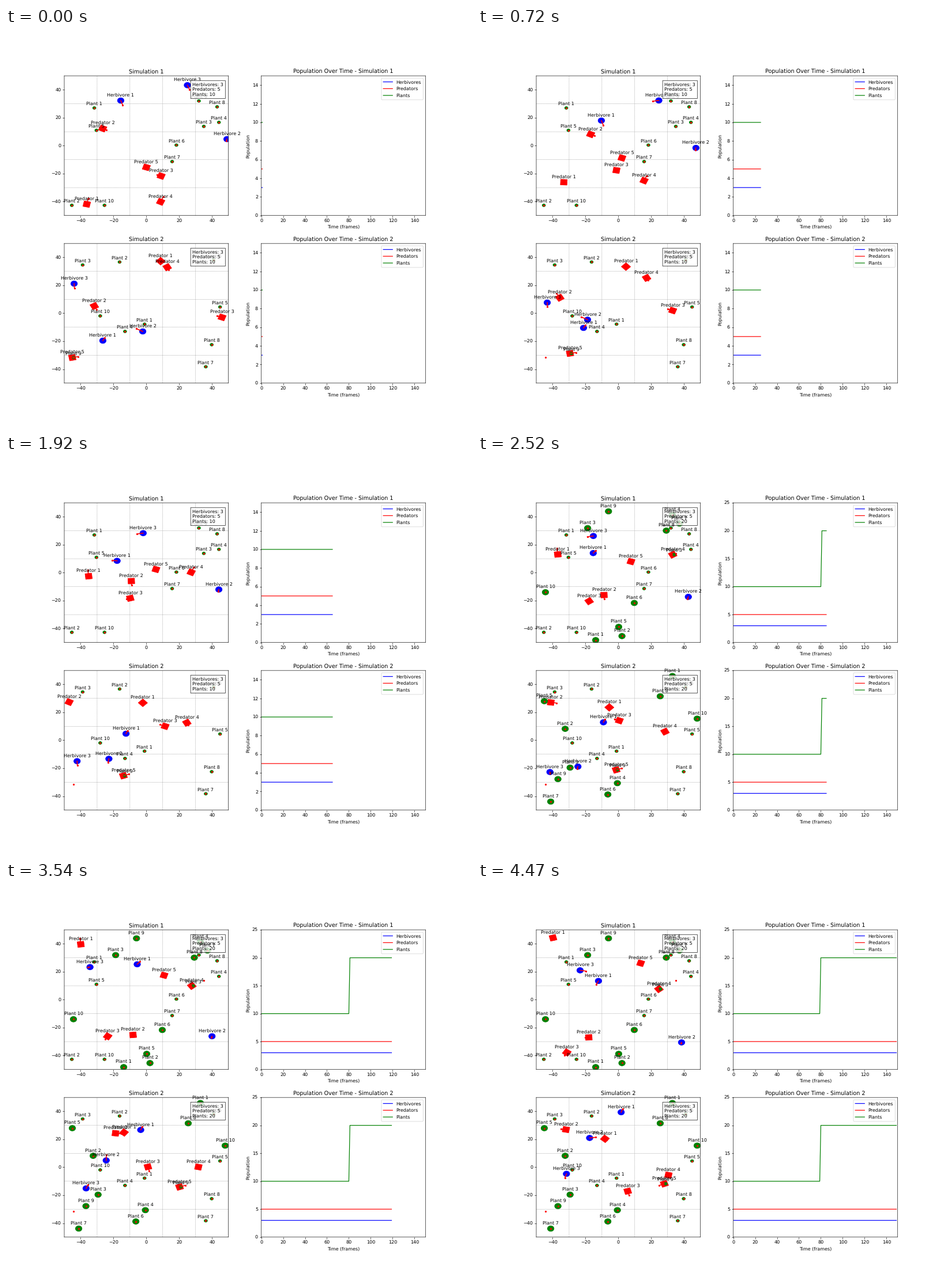
Recreate the animation shown at these times as a matplotlib script. Size 808 by 693 pixels, loop 4500 ms.

```python
import math

import matplotlib.pyplot as plt
import numpy as np
from matplotlib.animation import FuncAnimation
from matplotlib.patches import Circle, Polygon

plt.rcParams.update({"path.snap": False, "text.hinting": "none"})

DPI = 57.75
FRAMES, INTERVAL = 150, 30
SPROUT = 80          # step at which the second set of plants appears
WINDOW = 150         # longest history shown in the charts
HEADING = 5.5        # length of a heading line per unit of speed
REACH = 2.4          # a predator this close drags a plant along

STEPS = np.arange(FRAMES)
COLORS = {"Herbivore": "blue", "Predator": "red", "Plant": "green"}

# Movers run straight between a few turning points (step, x, y).
FIRST = {
    "Herbivore": [
        [(0, -15.6, 32.3), (42, -6.4, 7.2), (68, -19.9, 8.7), (120, -5, 26),
         (149, -12.1, 13.4)],
        [(0, 49.1, 4.7), (118, 40, -26.2), (149, 38.5, -30.6)],
        [(0, 25, 43.3), (17, 29.3, 33.1), (110, -32.5, 23.6), (128, -36.6, 23),
         (149, -23.3, 21)],
    ],
    "Predator": [
        [(0, -36.3, -41.9), (18, -33.3, -28), (40, -33, -21.3), (130, -41, 49),
         (149, -39.8, 44.3)],
        [(0, -26.6, 12.3), (42, -9.6, 5), (91, -8.6, -19.5), (124, -8, -26.5),
         (149, -18, -27)],
        [(0, 9, -21.7), (22, -0.9, -17.7), (52, -5, -17), (84, -17.8, -20.4),
         (108, -21, -22.5), (149, -31.4, -37.8)],
        [(0, 8.7, -40.2), (84, 33.1, 12.9), (118, 27.7, 9.9), (149, 24.7, 7.6)],
        [(0, 0, -15.5), (149, 13.6, 26.1)],
    ],
    "Plant": [
        (-31.7, 27), (-45.4, -42.7), (35, 13.8), (44.2, 16.7), (-30.4, 11),
        (18.3, 0.4), (15.7, -11.4), (43.1, 27.8), (32, 32), (-25.5, -42.7)],
    "Sprout": [
        (-13.8, -48.3), (2.2, -45.4), (-18.7, 31.9), (33, 41.4), (0.2, -38.8),
        (9.7, -21.7), (37.2, 35.2), (29.2, 30.1), (-6, 43.9), (-44.4, -14)],
}
SECOND = {
    "Herbivore": [
        [(0, -26.5, -19.6), (64, -12.4, 4.7), (149, 1.7, 39.4)],
        [(0, -2.2, -13), (28, -21.5, -3.2), (40, -20.5, -2), (66, -23, -14.2),
         (85, -24.7, -19.1), (139, -24.3, 20.2), (149, -17.5, 21)],
        [(0, -44, 21.2), (74, -41.9, -20.6), (96, -41.4, -25.3),
         (145, -30.9, -2.6), (149, -31.6, -4.7)],
    ],
    "Predator": [
        [(0, 8.7, 37.3), (94, -7.2, 21.9), (118, -13.6, 24.9), (149, -8.2, 20.4)],
        [(0, -31.7, 5.2), (7, -29.9, 1.8), (52, -45.2, 26.5), (73, -48.4, 28),
         (121, -16.8, 24.1), (149, -31.9, 27)],
        [(0, 46.1, -2.9), (91, -3.2, 15.5), (149, 5.7, -17.1)],
        [(0, 12.7, 33), (84, 28.4, 6.2), (118, 31.7, 0.2), (149, 30.5, -5.6)],
        [(0, -45.1, -31.7), (31, -24.9, -27.9), (61, -15.9, -26),
         (139, 33.5, -9.7), (149, 28, -11.8)],
    ],
    "Plant": [
        (-1.1, -7.8), (-16.3, 36.7), (-38.8, 34.6), (-13, -13), (44.9, 4.5),
        (41, 38), (36.2, -38.3), (39.8, -22.5), (-47, -30.7), (-28.1, -1.9)],
    "Sprout": [
        (32.9, 46), (-32.4, 8.2), (-29.4, -19.6), (-0.6, -30.7), (-45.1, 28),
        (-6.4, -38.8), (-41.2, -43.9), (25.5, 31.5), (-36.8, -27.8), (48, 15.5)],
}


def track(turns):
    """Position at every step along straight runs between turning points."""
    t, x, y = np.array(turns, float).T
    return np.column_stack([np.interp(STEPS, t, x), np.interp(STEPS, t, y)])


def rooted(home, hunters=()):
    """Track of a plant: still until a predator reaches it, then dragged."""
    spots = np.tile(np.array(home, float), (FRAMES, 1))
    for hunter in hunters:
        near = np.hypot(*(hunter - spots).T) < REACH
        if near.any():
            first = near.argmax()
            spots[first:] = hunter[first:] + (0.8, 0)
    return spots


def square(center, angle, half=2):
    corners = half * np.array([(-1, -1), (1, -1), (1, 1), (-1, 1)])
    c, s = math.cos(angle), math.sin(angle)
    return corners @ np.array([(c, s), (-s, c)]) + center


class Creature:
    def __init__(self, ax, kind, number, spots, radius=2, start=0):
        self.kind, self.spots, self.radius, self.start = kind, spots, radius, start
        # Each step shows the motion about to happen; the last repeats.
        moves = np.diff(spots, axis=0)
        self.moves = np.vstack([moves, moves[-1:]])
        home, color = spots[0], COLORS[kind]
        if kind == "Predator":
            self.body = Polygon(square(home, 0), color=color)
        else:
            self.body = Circle(home, radius, color=color)
        ax.add_patch(self.body)
        self.line, = ax.plot(*home[:, None], "r-", lw=2)
        self.dot, = ax.plot(*home[:, None], "ro", ms=3)
        self.label = ax.text(*home, f"{kind} {number}", ha="center")

    def update(self, step):
        for part in (self.body, self.line, self.dot, self.label):
            part.set_visible(step >= self.start)
        pos, move = self.spots[step], self.moves[step]
        self.label.set_position(pos + (0, self.radius + 1))
        if self.kind == "Predator":
            self.body.set_xy(square(pos, math.atan2(move[1], move[0])))
        else:
            self.body.center = pos
        if self.kind != "Plant":
            tip = pos + move * HEADING
            self.line.set_data(*np.transpose([pos, tip]))
            self.dot.set_data(*tip[:, None])


class Simulation:
    def __init__(self, number, data, field, chart):
        self.chart = chart
        field.set(xlim=(-50, 50), ylim=(-50, 50), title=f"Simulation {number}")
        for v in range(-30, 31, 20):
            style = dict(color="gray", ls="--", lw=0.5, zorder=0.5)
            field.axvline(v, **style)
            field.axhline(v, **style)

        self.creatures = []

        def add(kind, tracks, **options):
            for i, spots in enumerate(tracks, 1):
                self.creatures.append(Creature(field, kind, i, spots, **options))

        hunters = [track(turns) for turns in data["Predator"]]
        add("Herbivore", [track(turns) for turns in data["Herbivore"]])
        add("Predator", hunters)
        add("Plant", [rooted(p, hunters) for p in data["Plant"]], radius=1)
        self.stats = field.text(
            0.97, 0.953, "Herbivores: 3\nPredators: 5\nPlants: 10",
            transform=field.transAxes, ha="right", va="top", linespacing=1.13,
            multialignment="left", bbox=dict(facecolor="white", alpha=0.8))
        add("Plant", [rooted(p) for p in data["Sprout"]], start=SPROUT)

        chart.set(xlim=(0, 150), title=f"Population Over Time - Simulation {number}",
                  xlabel="Time (frames)", ylabel="Population")
        self.lines = [chart.plot([], [], color=color, label=kind + "s")[0]
                      for kind, color in COLORS.items()]
        chart.legend(loc="upper right")

    def update(self, step):
        for creature in self.creatures:
            creature.update(step)
        plants = 20 if step >= SPROUT else 10
        self.stats.set_text(f"Herbivores: 3\nPredators: 5\nPlants: {plants}")

        history = np.arange(step + 2)[-WINDOW:]
        counts = (np.full(len(history), 3), np.full(len(history), 5),
                  np.where(history > SPROUT, 20, 10))
        for line, values in zip(self.lines, counts):
            line.set_data(np.arange(len(history)), values)
        self.chart.set_ylim(0, plants + 5)


fig, axes = plt.subplots(2, 2, figsize=(808.1 / DPI, 693.1 / DPI), dpi=DPI)
sims = [Simulation(i, data, *row)
        for i, (data, row) in enumerate(zip((FIRST, SECOND), axes), 1)]


def draw(step):
    for sim in sims:
        sim.update(step)
    return []


anim = FuncAnimation(fig, draw, frames=FRAMES, interval=INTERVAL,
                     init_func=lambda: draw(0), repeat=True, repeat_delay=0)
plt.show()
```
